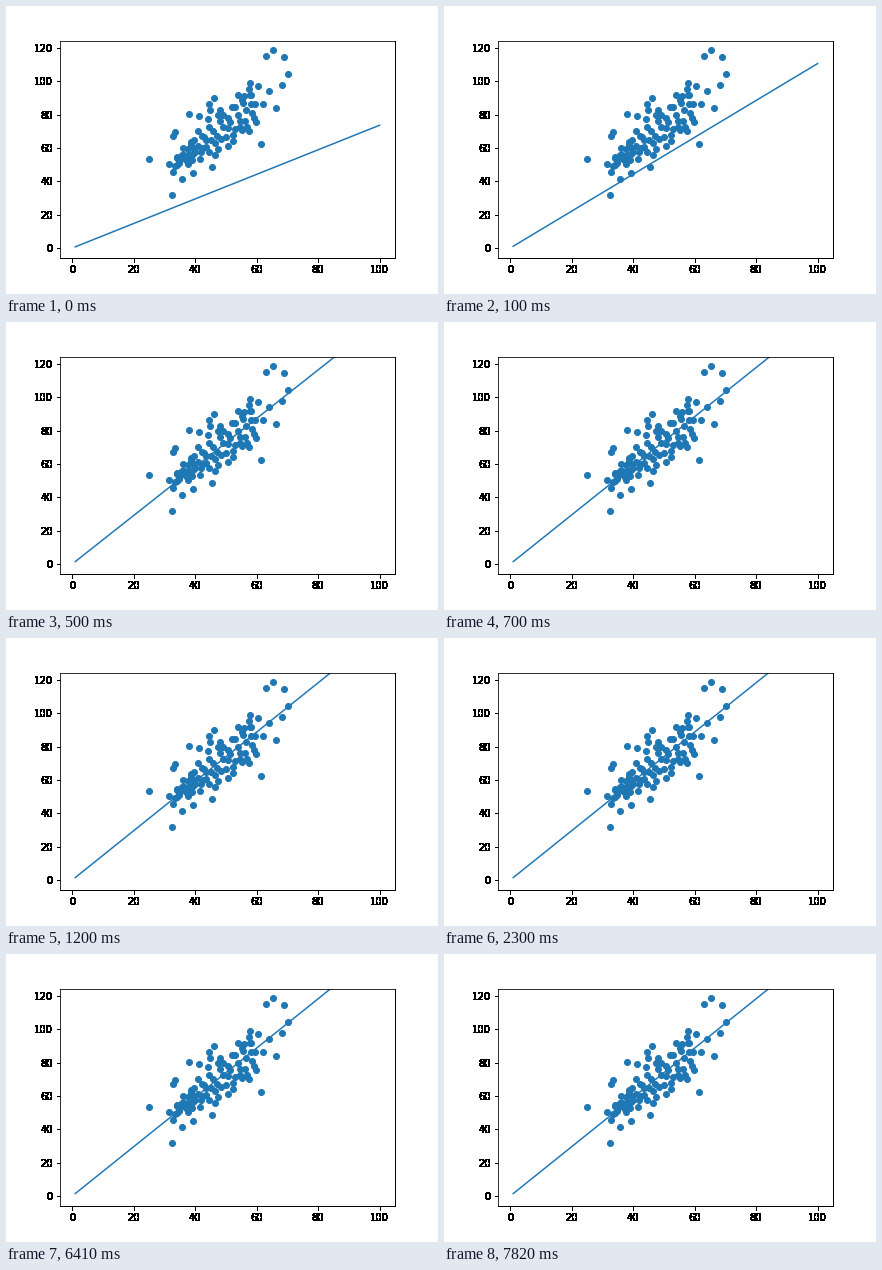
These frames come from a looping animation (432 px wide and 288 px high, 8000 ms). A matplotlib script:

```python
import numpy as np
import matplotlib.pyplot as plt
from matplotlib.animation import FuncAnimation

plt.rcParams.update({"font.family": "DejaVu Sans", "font.size": 10})

FRAMES, INTERVAL = 80, 100
SLOPE, DECAY = 1.4796, 0.5018     # limit of the descent and its error ratio per step
BLUE = "#1f77b4"
POINTS = 100

# Outlying points that give the cloud its outline.
RIM = [
    (25.1, 53.5), (31.6, 50.4), (32.5, 31.7), (32.7, 45.6), (35.6, 41.4),
    (39.3, 44.9), (45.6, 48.8), (32.9, 67.2), (33.6, 69.9), (38.1, 80.2),
    (41.4, 79.1), (44.7, 82.9), (44.5, 86.6), (46.2, 90.1), (57.4, 95.5),
    (57.8, 99.1), (60.3, 97.4), (64.1, 94.5), (63.0, 115.2), (65.4, 118.6),
    (68.8, 114.9), (70.3, 104.3), (68.3, 97.9), (66.2, 83.9), (62.2, 86.5),
    (61.5, 62.6),
]


def core_points(n):
    """Dense band along the regression line, wider towards the right."""
    rng = np.random.default_rng(7)
    x = np.linspace(33.5, 60, n) + rng.normal(0, 0.5, n)
    side = 2 * (np.arange(n) * 0.618034 % 1) - 1
    width = np.clip(4 + 0.7 * (x - 34), 3, 13)
    y = 1.3 * x + 8 + width * side + rng.normal(0, 1.2, n)
    return np.column_stack([x, y])


def harden(img, dpi):
    """Turn every touched pixel solid black."""
    img[..., :3] = 0
    img[..., 3] = img[..., 3] > 0
    return img, 0, 0


fig = plt.figure(figsize=(6, 4), dpi=72, facecolor="white")
ax = fig.add_axes([0.125, 0.125, 0.775, 0.755], facecolor="#fefefe")
ax.set(xlim=(-3.95, 104.95), ylim=(-5.93, 124.52),
       xticks=range(0, 101, 20), yticks=range(0, 121, 20))
for axis in (ax.xaxis, ax.yaxis):
    axis.set_agg_filter(harden)
for side in ("bottom", "right"):
    ax.spines[side].set_linewidth(1)

ax.scatter(*np.vstack([RIM, core_points(POINTS - len(RIM))]).T, color=BLUE)
xs = np.array([1, 100])
line, = ax.plot(xs, 0 * xs, color=BLUE, lw=1.5)


def update(i):
    m = SLOPE * (1 - DECAY ** (i + 1))
    line.set_ydata(m * xs + 0.02 * m)
    return line,


anim = FuncAnimation(fig, update, frames=FRAMES, interval=INTERVAL,
                     repeat=True, repeat_delay=0)
plt.show()
```
